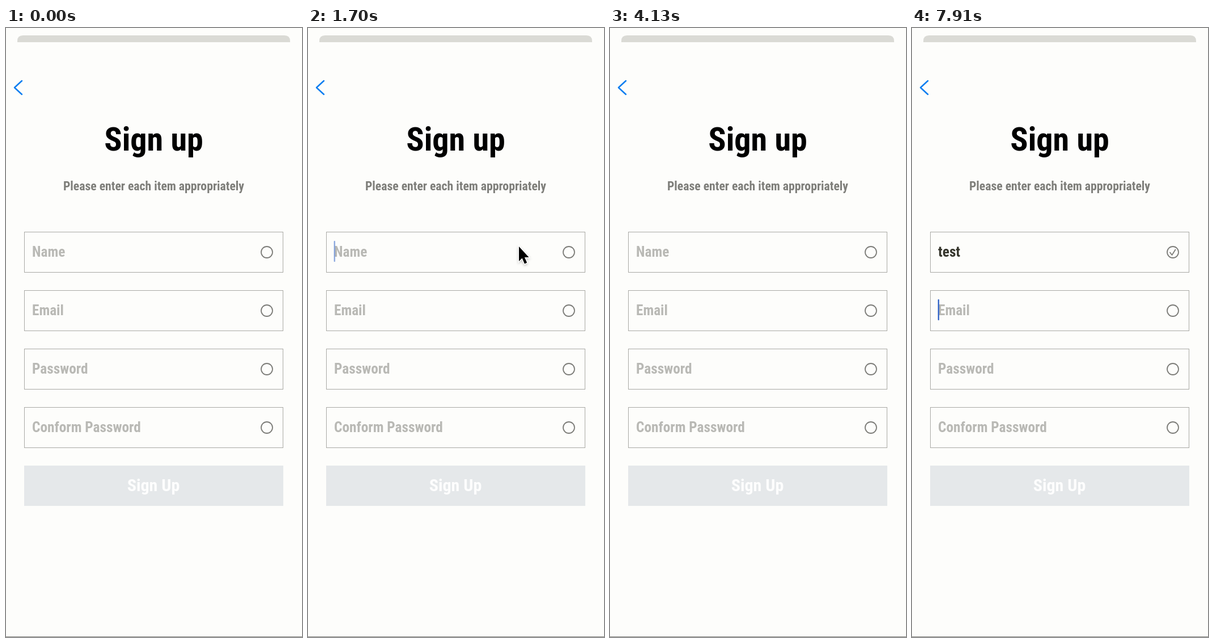
An HTML page that plays this animation: 522x1073 px, repeating every 8 s.

```html
<!DOCTYPE html>
<html lang="en">
<head>
<meta charset="utf-8">
<title>Sign up</title>
<style>
html, body { margin: 0; width: 100%; height: 100%; overflow: hidden; background: #fdfdfb; }
svg { display: block; width: 100%; height: 100%; }
text { font-family: "Roboto Condensed", Roboto, "Open Sans", sans-serif; font-stretch: 75%; font-weight: 700; white-space: pre; }
.mid { text-anchor: middle; }
.field { font-size: 25.3px; fill: #b9b9b5; }
.line { fill: none; stroke-linecap: round; stroke-linejoin: round; }
</style>
</head>
<body>
<svg viewBox="0 0 522 1073" xmlns="http://www.w3.org/2000/svg">
  <defs>
    <filter id="soft" x="-50%" y="-50%" width="200%" height="200%">
      <feDropShadow dx="0" dy="2" stdDeviation="2" flood-opacity=".25"/>
    </filter>
  </defs>
  <rect width="522" height="1073" fill="#fdfdfb"/>
  <path d="M20 25V23Q20 13 30 13H491Q501 13 501 23V25Z" fill="#dadad5"/>
  <path class="line" d="M28 93L15 105L28 117" stroke="#0a7df0" stroke-width="2.5"/>
  <text class="mid" x="260.5" y="215.8" font-size="58" style="font-weight: 800">Sign up</text>
  <text class="mid" x="260.5" y="286" font-size="21.7" fill="#7e7e7a">Please enter each item appropriately</text>
  <g id="fields"></g>
  <rect x="32" y="771" width="457" height="71" fill="#e5e8ea"/>
  <text class="mid" x="260" y="816" font-size="30" fill="#fdfdfd">Sign Up</text>
  <path id="check" class="line" d="M455 395.5L458.5 400L464.5 390.5" stroke="#7c7c78" stroke-width="1.8"/>
  <rect id="caret" y="375" width="2.4" height="37" rx="1" fill="#3567c8"/>
  <rect y="1072" width="522" height="1" fill="#85857f"/>
  <path id="pointer" d="M1 1V27L6.6 21.6L11 31.5L15.2 29.6L10.9 20H18.5Z" stroke="#fff" stroke-width="2.4" paint-order="stroke" filter="url(#soft)"/>
</svg>
<script>
const LOOP = 8000;
const FIELD_GAP = 103;
const TEXT_X = 46;
const DONE = 7650; // focus moves to the second field
const WORD = "test";
const KEYS = [6400, 6800, 7000, 7200];
// time, x, y
const PATH = [
  [240, 288, 1080], [700, 308, 635], [830, 308, 635], [1450, 371, 384],
  [2560, 371, 384], [2720, 451, 384], [3150, 451, 384], [3460, 535, 384]
];

const byId = id => document.getElementById(id);
const clamp = v => Math.max(0, Math.min(1, v));
const ease = v => v * v * (3 - 2 * v);

function add(tag, attrs, text = "") {
  const el = document.createElementNS("http://www.w3.org/2000/svg", tag);
  for (const key in attrs) el.setAttribute(key, attrs[key]);
  el.textContent = text;
  return byId("fields").appendChild(el);
}

const labels = ["Name", "Email", "Password", "Conform Password"].map((label, i) => {
  const y = 359 + i * FIELD_GAP;
  add("rect", { x: 32.5, y: y + .5, width: 456, height: 71, fill: "none", stroke: "#a9a9a5" });
  add("circle", { cx: 460, cy: y + 36, r: 10, fill: "none", stroke: "#7c7c78", "stroke-width": 1.8 });
  return add("text", { class: "field", x: TEXT_X, y: y + 43.6 }, label);
});

function pointerAt(t) {
  const i = PATH.findIndex(p => p[0] > t);
  if (i < 1) return null;
  const [t0, x0, y0] = PATH[i - 1], [t1, x1, y1] = PATH[i];
  const k = ease((t - t0) / (t1 - t0));
  return [x0 + (x1 - x0) * k, y0 + (y1 - y0) * k];
}

function caretAlpha(t) {
  if (t >= KEYS[0]) return 1;
  if (t < 600) return 0;
  const phase = (t - 600) % 1000;
  return clamp((phase - 80) / 38) * clamp((520 - phase) / 80);
}

function draw(t) {
  const typed = KEYS.filter(k => t >= k).length;
  const name = labels[0];
  name.textContent = typed ? WORD.slice(0, typed) : "Name";
  name.style.fill = typed ? "#35352c" : "";
  byId("check").style.display = typed ? "" : "none";

  const next = t >= DONE;
  const caret = byId("caret");
  caret.setAttribute("x", TEXT_X - .4 + (typed && !next ? name.getComputedTextLength() : 0));
  caret.setAttribute("y", next ? 375 + FIELD_GAP : 375);
  caret.setAttribute("opacity", caretAlpha(t));

  const pos = pointerAt(t);
  byId("pointer").style.display = pos ? "" : "none";
  if (pos) byId("pointer").setAttribute("transform", `translate(${pos})`);
}

const start = performance.now();
function tick() {
  draw((performance.now() - start) % LOOP);
  requestAnimationFrame(tick);
}
tick();
</script>
</body>
</html>
```
